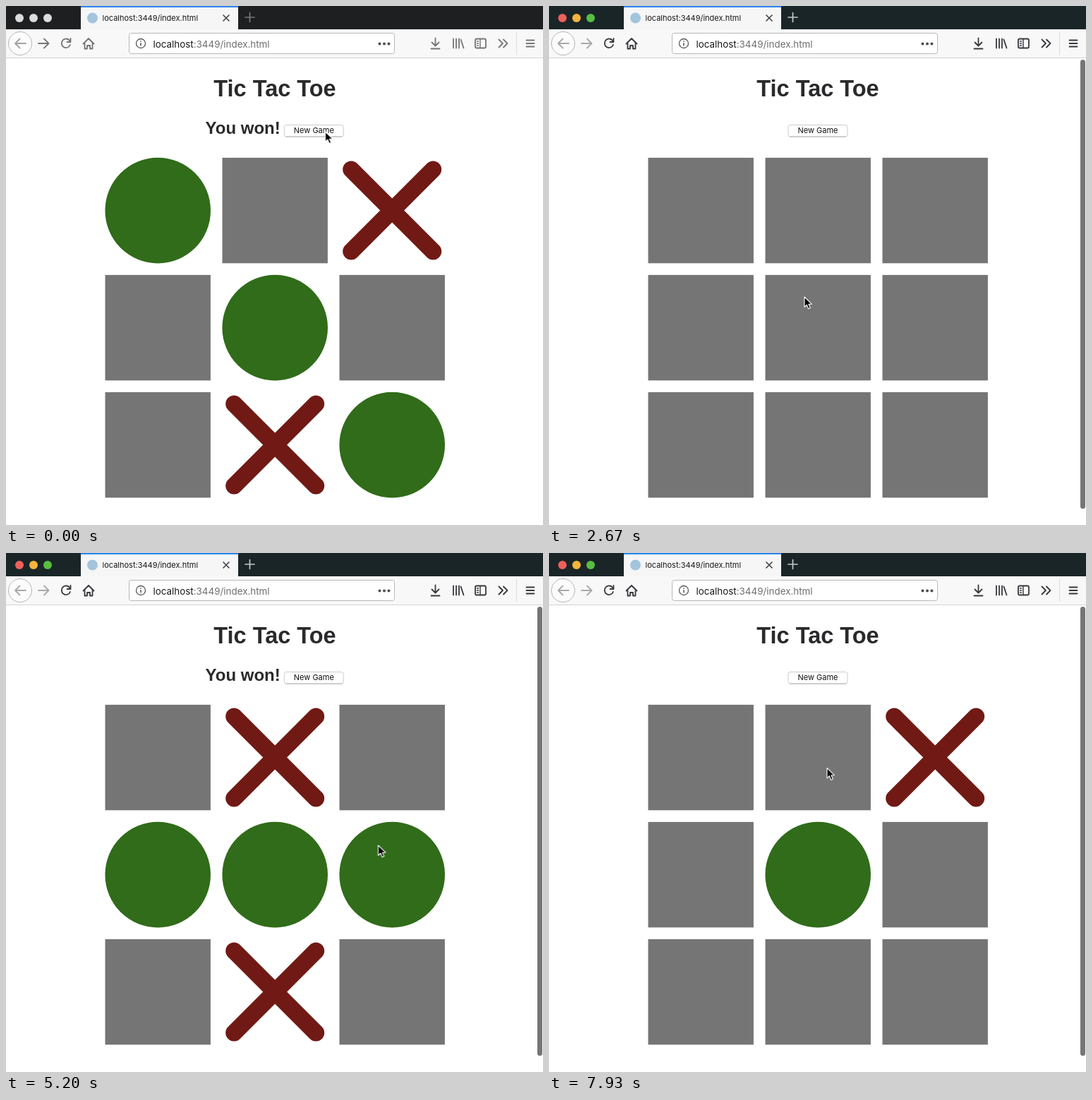
Recreate the animation shown at these times as an HTML page. Size 761 by 735 pixels, loop 8 s.

```html
<!DOCTYPE html>
<html lang="en">
<head>
<meta charset="utf-8">
<title>Tic Tac Toe</title>
<style>
  html, body { margin: 0; width: 100%; height: 100%; overflow: hidden; background: #fff; }
  svg { display: block; width: 761px; height: 735px; animation: theme 8s step-end infinite; }
  .ui { font-family: Inter, Roboto, sans-serif; }
  .page { font-family: "Liberation Sans", Arial, sans-serif; font-weight: bold; fill: #2a2a2c; }
  .icon { fill: none; stroke: var(--ink); stroke-width: 1.8; stroke-linecap: round; stroke-linejoin: round; }
  .dot { fill: var(--ink); }

  .first, .second, .third, .fourth, .rematch, .won, .scroll {
    visibility: hidden;
    animation: 8s step-end infinite;
  }
  .first { animation-name: first; }
  .second { animation-name: second; }
  .third { animation-name: third; }
  .fourth { animation-name: fourth; }
  .rematch { animation-name: rematch; }
  .won { animation-name: won; }
  .scroll { animation-name: scroll; }
  .button { animation: button 8s step-end infinite; }
  .cursor { animation: cursor 8s ease-in-out infinite; }

  /* window gains focus */
  @keyframes theme {
    0% { --bar: #1e1f21; --ink: #757577; --forward: #757577; --back: #a2a2a4; --red: #dcdcdc; --yellow: #dcdcdc; --green: #dcdcdc; --plus: #77797b; }
    8% { --bar: #1a2528; --ink: #38383d; --forward: #a9a9ab; --back: #a9a9ab; --red: #f0605a; --yellow: #f6b53c; --green: #57bf42; --plus: #c3c7c8; }
  }
  @keyframes first { 0% { visibility: visible } 8.375% { visibility: hidden } }
  @keyframes second { 0% { visibility: hidden } 35.875% { visibility: visible } 73.375% { visibility: hidden } }
  @keyframes third { 0% { visibility: hidden } 47.5% { visibility: visible } 73.375% { visibility: hidden } }
  @keyframes fourth { 0% { visibility: hidden } 60.875% { visibility: visible } 73.375% { visibility: hidden } }
  @keyframes rematch { 0% { visibility: hidden } 86.25%, 100% { visibility: visible } }
  @keyframes won {
    0% { visibility: visible } 8.375% { visibility: hidden }
    60.875% { visibility: visible } 73.375% { visibility: hidden }
  }
  @keyframes scroll { 0% { visibility: hidden } 11.7%, 100% { visibility: visible } }
  @keyframes button {
    0% { transform: translateX(55.3px) } 8.375% { transform: none }
    60.875% { transform: translateX(55.3px) } 73.375% { transform: none }
  }
  @keyframes cursor {
    0%, 9% { transform: translate(452.5px, 178px) }
    15%, 23% { transform: translate(449.5px, 176px) }
    33%, 38.5% { transform: translate(362px, 412px) }
    42.5% { transform: translate(331.5px, 371px) }
    47.5%, 53% { transform: translate(246.5px, 428px) }
    60%, 66% { transform: translate(527.5px, 414px) }
    72%, 76% { transform: translate(436px, 177px) }
    83.5%, 90% { transform: translate(380px, 428px) }
    99%, 100% { transform: translate(394px, 304.5px) }
  }
</style>
</head>
<body>
<svg viewBox="0 0 761 735">
  <defs>
    <rect id="cell" x="-74.7" y="-74.7" width="149.4" height="149.4" fill="#757575"/>
    <rect id="blank" x="-76" y="-76" width="152" height="152" fill="#fff"/>
    <g id="O"><use href="#blank"/><circle r="74.8" fill="#306c19"/></g>
    <g id="X">
      <use href="#blank"/>
      <path d="M-58-58 58 58M58-58-58 58" stroke="#711a15" stroke-width="24" stroke-linecap="round"/>
    </g>
  </defs>
  <rect width="761" height="735" fill="#fff"/>

  <g class="ui">
    <rect width="761" height="33" fill="var(--bar)"/>
    <circle cx="19" cy="17" r="6" fill="var(--red)"/>
    <circle cx="39" cy="17" r="6" fill="var(--yellow)"/>
    <circle cx="59" cy="17" r="6" fill="var(--green)"/>
    <rect x="106" width="223" height="34" fill="#f6f6f7"/>
    <rect x="106" width="223" height="2" fill="#2d86f0"/>
    <circle cx="122.5" cy="17" r="7.5" fill="#a3c4dc"/>
    <text x="136.5" y="21" font-size="11" fill="#18181a">localhost:3449/index.html</text>
    <path d="M308 13l8 8m0-8-8 8" fill="none" stroke="#47474a" stroke-width="1.7" stroke-linecap="round"/>
    <path d="M339 16h13m-6.5-6.5v13" stroke="var(--plus)" stroke-width="1.7" stroke-linecap="round"/>

    <rect y="33" width="761" height="40" fill="#f8f8f9"/>
    <rect y="73" width="761" height="1" fill="#d2d2d4"/>
    <circle cx="20" cy="53" r="16.5" fill="#fcfcfc" stroke="#b6b6b8"/>
    <path class="icon" style="stroke:var(--back)" d="M28 53H13m6.5-6.5L13 53l6.5 6.5"/>
    <path class="icon" style="stroke:var(--forward)" d="M46 53h14.500m-6.500-6.500 6.500 6.500-6.500 6.500"/>
    <path class="icon" d="M90.500 49.500A6.300 6.300 0 1 0 91 55M91.500 46v5h-5"/>
    <path class="icon" d="M109.500 53.500l7.500-7.500 7.500 7.500M111.500 53v7.500h3.500v-4.500h4v4.500h3.500V53"/>

    <rect x="174.500" y="38.500" width="376" height="29" rx="3" fill="#fff" stroke="#b8b8ba"/>
    <circle cx="191" cy="53" r="6.500" fill="none" stroke="#58585b" stroke-width="1.300"/>
    <path d="M191 52.300v4M191 49.200v1.500" stroke="#58585b" stroke-width="1.600"/>
    <text x="208.500" y="58.500" font-size="13.400" fill="#6f6f72"><tspan fill="#18181a">localhost</tspan>:3449/index.html</text>
    <g fill="#4c4c50">
      <circle cx="529.500" cy="53.500" r="2"/><circle cx="536" cy="53.500" r="2"/><circle cx="542.500" cy="53.500" r="2"/>
    </g>

    <path class="icon" d="M608.500 45.500v11m-5-5 5 5 5-5M602.500 60.500h12"/>
    <path class="icon" stroke-linecap="butt" d="M634 46.500v13M638 46.500v13M642 46.500v13M644.500 47.500l4 12"/>
    <rect class="icon" x="665" y="46.500" width="15" height="13" rx="2"/>
    <path class="icon" style="stroke-width:1.400" d="M672 47v12M667.500 50h2M667.500 53h2M667.500 56h2"/>
    <path class="icon" d="M698.500 47.500l5.500 5.500-5.500 5.500M705 47.500l5.500 5.500-5.500 5.500"/>
    <path d="M723.500 37v32" stroke="#dcdcde"/>
    <path class="icon" d="M737.500 48.500h11M737.500 53h11M737.500 57.500h11"/>
  </g>

  <g class="page">
    <text x="381" y="128" font-size="32.500" text-anchor="middle">Tic Tac Toe</text>
    <text class="won" x="282.500" y="180.500" font-size="24">You won!</text>
  </g>
  <g class="button ui">
    <rect x="339" y="168.500" width="84" height="16.500" rx="3" fill="#fff" stroke="#cbcbcb"/>
    <path d="M341 185.200h80" stroke="#acacac" stroke-width=".8"/>
    <text x="381" y="180.300" font-size="11" text-anchor="middle" fill="#111">New Game</text>
  </g>

  <g id="board"></g>
  <rect class="scroll" x="753" y="76" width="7" height="636" rx="3.500" fill="#757575"/>
  <path class="cursor" d="M0 0V14.300L3.300 11.200 5.700 16.700 8.300 15.500 5.900 10.200H10.300Z" fill="#000" stroke="#fff" stroke-width="1.100" stroke-linejoin="round"/>
</svg>
<script>
  // Marks by cell index, row by row; "." leaves the cell empty.
  const turns = {
    first: "O.X.O..XO",
    second: "....O..X.",
    third: ".X.O.....",
    fourth: ".....O...",
    rematch: "..X.O....",
  };

  const place = (id, i) =>
    `<use href="#${id}" x="${215.2 + 166 * (i % 3)}" y="${289.6 + 166 * Math.floor(i / 3)}"/>`;

  const layer = ([name, marks]) =>
    `<g class="${name}">${[...marks].map((m, i) => m === "." ? "" : place(m, i)).join("")}</g>`;

  document.getElementById("board").innerHTML =
    [..."123456789"].map((_, i) => place("cell", i)).join("") +
    Object.entries(turns).map(layer).join("");
</script>
</body>
</html>
```
